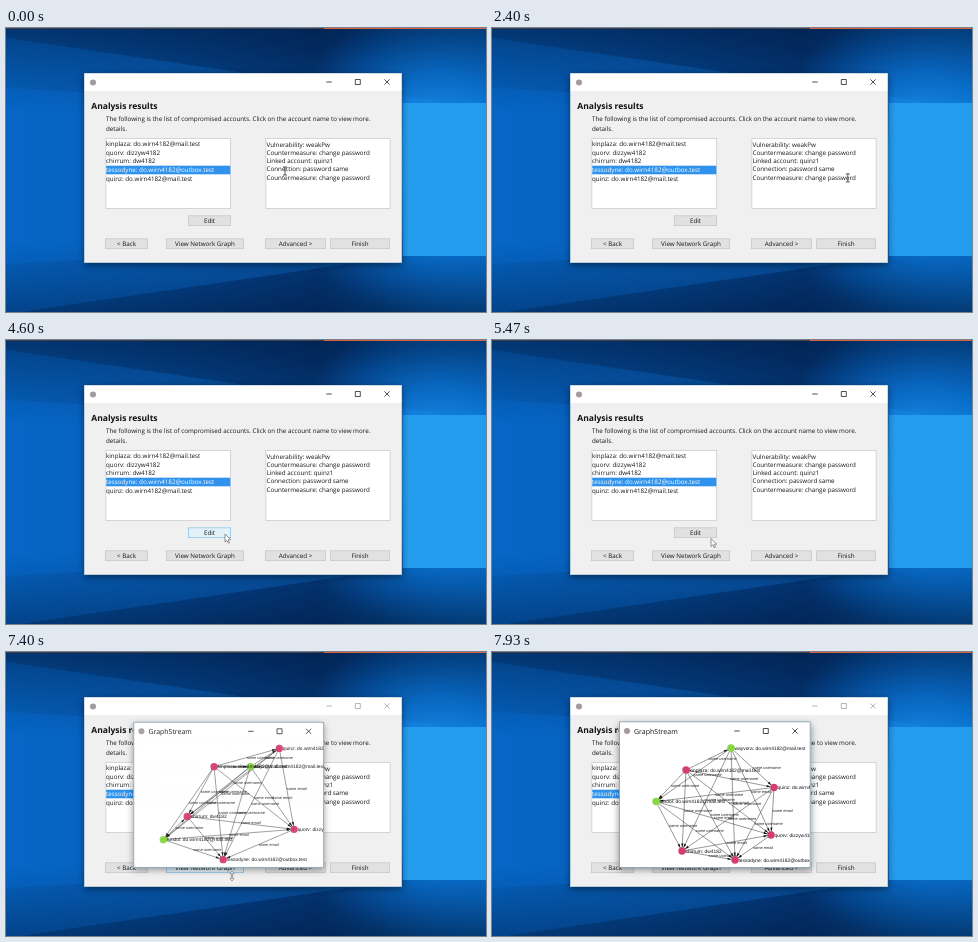
Recreate the animation shown at these times as an HTML page with a canvas. Size 480 px wide and 284 px high, loop 8000 ms.

```html
<!DOCTYPE html>
<html lang="en">
<head>
<meta charset="utf-8">
<title>Analysis results</title>
<style>
html, body { margin: 0; width: 100%; height: 100%; overflow: hidden; background: #04509f; }
canvas { display: block; width: 480px; height: 284px; }
</style>
</head>
<body>
<canvas id="stage"></canvas>
<script>
const W = 480, H = 284, LOOP = 8000;
const canvas = document.getElementById('stage');
const ctx = canvas.getContext('2d');
const ratio = Math.max(1, window.devicePixelRatio || 1);
canvas.width = W * ratio;
canvas.height = H * ratio;

const UI = '"Open Sans", "Noto Sans", sans-serif';
const ARIAL = '"Liberation Sans", Arial, sans-serif';
const MAIL = 'do.wirn4182@mail.test';
const PINK = '#d43d70', GREEN = '#85d940', ICON = '#a39a9e';

const accounts = [
  'kinplaza: ' + MAIL,
  'quorv: dizzyw4182',
  'chirrum: dw4182',
  'tessodyne: do.wirn4182@outbox.test',
  'quinz: ' + MAIL
];
const details = [
  'Vulnerability: weakPw',
  'Countermeasure: change password',
  'Linked account: quinz1',
  'Connection: password same',
  'Countermeasure: change password'
];
const buttons = [
  { label: 'Edit', x: 182, y: 187.5, w: 43 },
  { label: '< Back', x: 99, y: 210.5, w: 43 },
  { label: 'View Network Graph', x: 160, y: 210.5, w: 78 },
  { label: 'Advanced >', x: 259, y: 210.5, w: 61 },
  { label: 'Finish', x: 324, y: 210.5, w: 60 }
];
const nodes = [
  { label: accounts[0], color: PINK, from: [208, 114.5], to: [194, 118] },
  { label: 'wayvora: ' + MAIL, color: GREEN, from: [244.5, 114.5], to: [239, 96] },
  { label: accounts[4], color: PINK, from: [273.5, 96], to: [282, 135.5] },
  { label: 'fundol: ' + MAIL, color: GREEN, from: [157, 188], to: [164, 149.5] },
  { label: accounts[2], color: PINK, from: [181, 164.5], to: [190, 199] },
  { label: accounts[1], color: PINK, from: [288.5, 177.5], to: [279, 183], email: true },
  { label: accounts[3], color: PINK, from: [217, 208], to: [243, 208] }
];
// Pointer stops: time, x, y
const pointerPath = [
  [0, 279, 143], [300, 279, 143], [1250, 315, 124], [1700, 315, 124],
  [2700, 367, 157], [3500, 367, 157], [4350, 219, 194], [5300, 219, 194],
  [5900, 219, 217], [7100, 219, 217], [7380, 226, 224], [LOOP, 226, 224]
];
const GRAPH_START = 7290, POINTER_END = 7750;

const clamp = v => Math.min(1, Math.max(0, v));
const mix = (a, b, k) => a + (b - a) * k;
const smooth = k => k * k * (3 - 2 * k);
const inside = (p, x, y, w, h) => p.x >= x && p.x <= x + w && p.y >= y && p.y <= y + h;

function pointerAt(t) {
  const i = pointerPath.findIndex(stop => stop[0] > t);
  const a = pointerPath[i - 1], b = pointerPath[i];
  const k = smooth((t - a[0]) / (b[0] - a[0]));
  return { x: mix(a[1], b[1], k), y: mix(a[2], b[2], k) };
}

function rect(x, y, w, h, fill, border) {
  ctx.fillStyle = fill;
  ctx.fillRect(x, y, w, h);
  if (!border) return;
  ctx.strokeStyle = border;
  ctx.lineWidth = 0.7;
  ctx.strokeRect(x + 0.35, y + 0.35, w - 0.7, h - 0.7);
}

function text(str, x, y, size = 6.26, color = '#161616', family = UI, weight = 400, align = 'left') {
  ctx.font = `${weight} ${size}px ${family}`;
  ctx.fillStyle = color;
  ctx.textAlign = align;
  ctx.fillText(str, x, y);
}

function disc(x, y, r, color) {
  ctx.fillStyle = color;
  ctx.beginPath();
  ctx.arc(x, y, r, 0, 7);
  ctx.fill();
}

function polygon(points, fill, stroke) {
  ctx.beginPath();
  points.forEach(([x, y]) => ctx.lineTo(x, y));
  ctx.closePath();
  ctx.fillStyle = fill;
  ctx.fill();
  if (!stroke) return;
  ctx.strokeStyle = stroke;
  ctx.lineWidth = 0.7;
  ctx.stroke();
}

function gradient(g, stops) {
  stops.forEach(([at, color]) => g.addColorStop(at, color));
  return g;
}

function drawDesktop() {
  rect(0, 0, W, H, gradient(ctx.createLinearGradient(0, 0, W, 0), [
    [0, '#035fb8'], [0.3, '#034f9f'], [0.65, '#033a7c'], [0.85, '#04559f'], [1, '#0567b9']
  ]));
  rect(0, 0, W, H, gradient(ctx.createLinearGradient(0, 0, 0, H), [
    [0, 'rgba(2,18,52,.55)'], [0.3, 'rgba(2,18,52,0)'], [0.75, 'rgba(2,18,52,0)'], [1, 'rgba(2,18,52,.5)']
  ]));
  // Light falls to the left in nested wedges.
  const beam = gradient(ctx.createLinearGradient(430, 0, 0, 0), [
    [0, 'rgba(20,135,240,.3)'], [1, 'rgba(8,115,225,.2)']
  ]);
  for (const [near, far] of [[75, 138], [64, 88]]) {
    polygon([[430, 148 - near], [0, 148 - far], [0, 148 + far], [430, 148 + near]], beam);
  }
  rect(270, 0, 210, H, gradient(ctx.createRadialGradient(425, 135, 20, 425, 135, 155), [
    [0, 'rgba(40,165,250,.9)'], [0.5, 'rgba(12,125,230,.6)'], [1, 'rgba(5,90,190,0)']
  ]));
  rect(397, 75, 153, 153, '#249cee');
  rect(0, 0, 318, 1, '#3c4250');
  rect(318, 0, 162, 1, '#e0603c');
}

function drawFrame(x, y, w, h, fill, border) {
  ctx.save();
  ctx.shadowColor = 'rgba(0,0,0,.45)';
  ctx.shadowBlur = 7 * ratio;
  ctx.shadowOffsetY = 2 * ratio;
  rect(x, y, w, h, fill);
  ctx.restore();
  rect(x, y, w, h, fill, border);
}

function drawCaption(x, y, color) {
  ctx.strokeStyle = color;
  ctx.lineWidth = 0.8;
  ctx.beginPath();
  ctx.moveTo(x - 2.7, y);
  ctx.lineTo(x + 2.7, y);
  ctx.rect(x + 26.3, y - 2.5, 5, 5);
  for (const d of [-1, 1]) {
    ctx.moveTo(x + 55.4, y - 2.6 * d);
    ctx.lineTo(x + 60.6, y + 2.6 * d);
  }
  ctx.stroke();
}

function drawDialog(pointer, active) {
  drawFrame(78, 45, 318, 190, '#f0f0f0', '#a9bccd');
  rect(78.7, 45.7, 316.6, 17.3, '#fff');
  disc(87, 54.5, 3, ICON);
  drawCaption(323, 54, active ? '#222' : '#a2a2a2');

  text('Analysis results', 85.3, 81.3, 8.5, '#111', UI, 700);
  text('The following is the list of compromised accounts. Click on the account name to view more.', 100, 93.2);
  text('details.', 100, 103.2);

  rect(99.5, 110, 125.5, 71, '#fff', '#c0c4c8');
  rect(259.5, 110, 125, 71, '#fff', '#c0c4c8');
  accounts.forEach((line, i) => {
    const selected = i === 3;
    if (selected) rect(100.2, 137.7, 124.1, 8.6, '#2f93ee');
    text(line, 100, 117.9 + i * 8.75, 6.26, selected ? '#fff' : '#161616');
  });
  details.forEach((line, i) => text(line, 260.5, 118.8 + i * 8.2));

  for (const { label, x, y, w } of buttons) {
    const hover = inside(pointer, x, y, w, 10.5);
    rect(x, y, w, 10.5, hover ? '#e3f1fb' : '#e1e1e1', hover ? '#86bfe9' : '#c6c6c6');
    text(label, x + w / 2, y + 7.8, 6.26, '#161616', UI, 400, 'center');
  }
}

function drawEdge(a, b, label) {
  const angle = Math.atan2(b.y - a.y, b.x - a.x);
  const spot = (back, side) => [
    b.x - back * Math.cos(angle) - side * Math.sin(angle),
    b.y - back * Math.sin(angle) + side * Math.cos(angle)
  ];
  ctx.strokeStyle = '#333';
  ctx.lineWidth = 0.5;
  ctx.beginPath();
  ctx.moveTo(a.x, a.y);
  ctx.lineTo(b.x, b.y);
  ctx.stroke();
  polygon([spot(3.5, 0), spot(7.5, 1.1), spot(7.5, -1.1)], '#111');
  text(label, (a.x + b.x) / 2, (a.y + b.y) / 2 + 1.2, 3.95, '#222', ARIAL);
}

function drawGraph(t) {
  const opening = clamp((t - GRAPH_START) / 170);
  const settle = 1 - (1 - clamp((t - 7400) / 520)) ** 2;
  const scale = mix(0.96, 1, 1 - (1 - opening) ** 2);
  ctx.save();
  ctx.globalAlpha = 1 - (1 - opening) ** 2.6;
  ctx.translate(222.5, 143);
  ctx.scale(scale, scale);
  ctx.translate(-222.5, -143);
  drawFrame(127, 69.5, 191.5, 146.5, '#fff', '#5f8799');
  disc(135, 79, 3, ICON);
  text('GraphStream', 142, 81.6, 7, '#151515');
  drawCaption(245, 79, '#222');

  ctx.beginPath();
  ctx.rect(128, 88, 190, 127.5);
  ctx.clip();
  const placed = nodes.map(n => ({
    ...n, x: mix(n.from[0], n.to[0], settle), y: mix(n.from[1], n.to[1], settle)
  }));
  placed.forEach((a, i) => placed.slice(i + 1).forEach(b =>
    drawEdge(a, b, a.email || b.email ? 'same email' : 'same username')));
  placed.forEach(n => disc(n.x, n.y, 3.7, n.color));
  placed.forEach(n => text(n.label, n.x + 3.5, n.y + 1.7, 4.9, '#111', ARIAL));
  ctx.restore();
}

function drawPointer({ x, y }, resizing) {
  ctx.save();
  ctx.translate(x, y);
  if (resizing) {
    polygon([[0, -5], [2, -2.4], [0.6, -2.4], [0.6, 2.4], [2, 2.4], [0, 5],
      [-2, 2.4], [-0.6, 2.4], [-0.6, -2.4], [-2, -2.4]], '#fff', '#777');
  } else if (inside({ x, y }, 260, 110, 124, 71)) {
    ctx.strokeStyle = '#333';
    ctx.lineWidth = 0.8;
    ctx.beginPath();
    for (const end of [-4, 4]) {
      ctx.moveTo(-2, end);
      ctx.lineTo(2, end);
    }
    ctx.moveTo(0, -4);
    ctx.lineTo(0, 4);
    ctx.stroke();
  } else {
    polygon([[0, 0], [0, 8], [1.9, 6.3], [3.2, 9.2], [4.5, 8.6], [3.2, 5.8], [5.7, 5.6]], '#fff', '#666');
  }
  ctx.restore();
}

function render(t) {
  ctx.setTransform(ratio, 0, 0, ratio, 0, 0);
  ctx.textRendering = 'geometricPrecision';
  const graphOpen = t >= GRAPH_START;
  const pointer = pointerAt(t);
  // The pressed button stays lit until the pointer is gone.
  const hoverPoint = !graphOpen ? pointer : t < POINTER_END ? { x: 219, y: 217 } : { x: 0, y: 0 };
  drawDesktop();
  drawDialog(hoverPoint, !graphOpen);
  if (graphOpen) drawGraph(t);
  if (t < POINTER_END) drawPointer(pointer, graphOpen);
}

const start = performance.now();
function tick() {
  render((performance.now() - start) % LOOP);
  requestAnimationFrame(tick);
}
tick();
</script>
</body>
</html>
```
